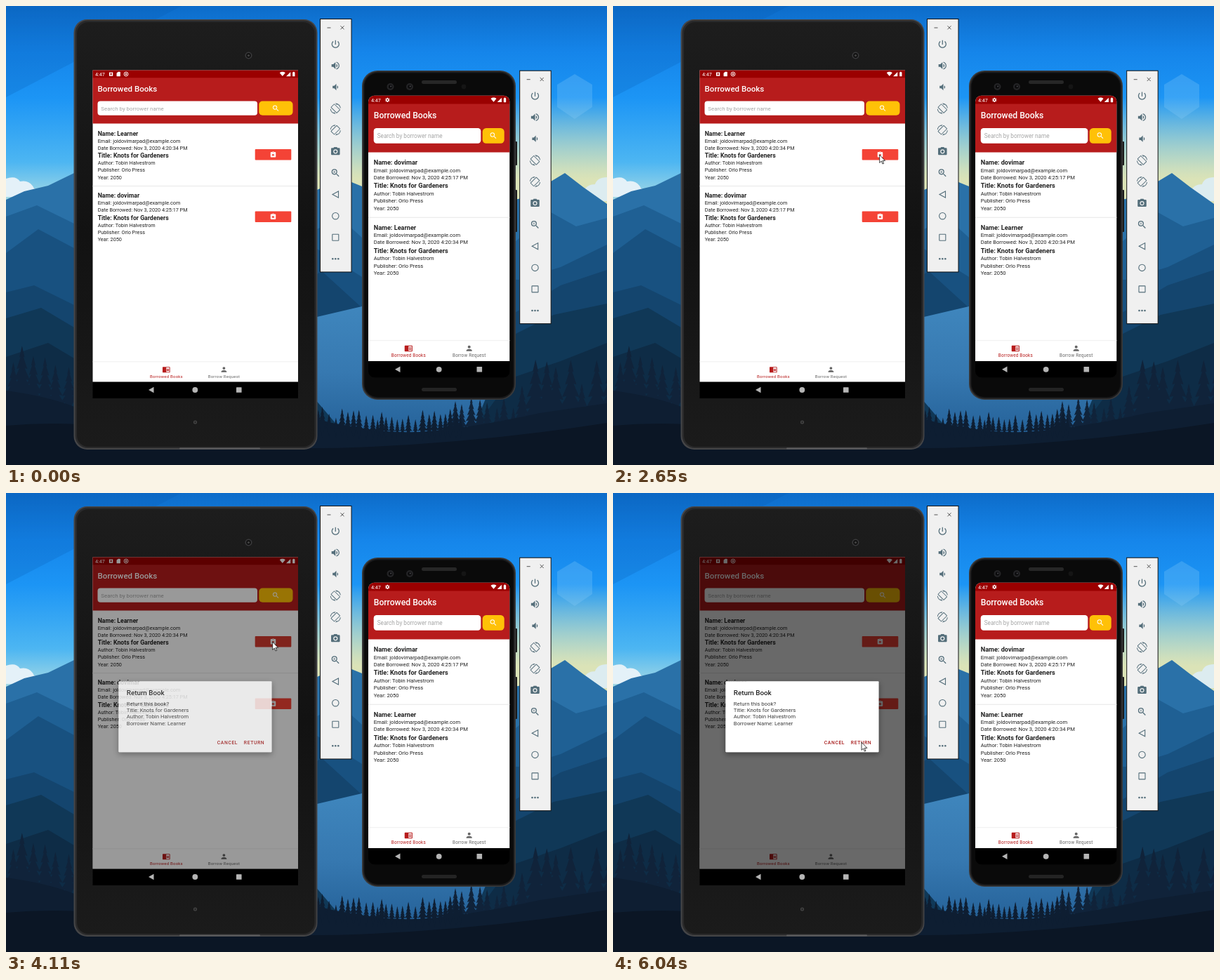
Write an HTML page that moves like this. It is 856x654 px and loops after 8 s.

```html
<!DOCTYPE html>
<html lang="en">
<head>
<meta charset="utf-8">
<title>Borrowed Books</title>
<style>
html, body { margin: 0; width: 100%; height: 100%; overflow: hidden; background: #0b1422; }
svg { display: block; width: 100%; height: 100%; font-family: Roboto, "Noto Sans", sans-serif; user-select: none; }
</style>
</head>
<body>
<svg id="stage" viewBox="0 0 856 654"></svg>
<script>
const LOOP = 8000;
const stage = document.getElementById('stage');

const icons = {
  search: 'M15.5 14h-.79l-.28-.27A6.47 6.47 0 0 0 16 9.5 6.5 6.5 0 1 0 9.5 16c1.61 0 3.09-.59 4.23-1.57l.27.28v.79l5 4.99L20.49 19l-4.99-5zm-6 0C7.01 14 5 11.99 5 9.5S7.01 5 9.5 5 14 7.01 14 9.5 11.99 14 9.5 14z',
  person: 'M12 12a4 4 0 1 0 0-8 4 4 0 0 0 0 8zm0 2c-2.67 0-8 1.34-8 4v2h16v-2c0-2.66-5.33-4-8-4z',
  reader: 'M13 12h7v1.5h-7zm0-2.5h7V11h-7zm0 5h7V16h-7zM21 4H3c-1.1 0-2 .9-2 2v13c0 1.1.9 2 2 2h18c1.1 0 2-.9 2-2V6c0-1.1-.9-2-2-2zm0 15h-9V6h9v13z',
  giveBack: 'M19 3h-4.18C14.4 1.84 13.3 1 12 1s-2.4.84-2.82 2H5c-1.1 0-2 .9-2 2v14c0 1.1.9 2 2 2h14c1.1 0 2-.9 2-2V5c0-1.1-.9-2-2-2zm-7 0c.55 0 1 .45 1 1s-.45 1-1 1-1-.45-1-1 .45-1 1-1zm4 12h-4v3l-5-5 5-5v3h4v4z',
  power: 'M13 3h-2v10h2V3zm4.83 2.17l-1.42 1.42C17.99 7.86 19 9.81 19 12c0 3.87-3.13 7-7 7s-7-3.13-7-7c0-2.19 1.01-4.14 2.58-5.42L6.17 5.17C4.23 6.82 3 9.26 3 12c0 4.97 4.03 9 9 9s9-4.03 9-9c0-2.74-1.23-5.18-3.17-6.83z',
  louder: 'M3 9v6h4l5 5V4L7 9H3zm13.5 3c0-1.77-1.02-3.29-2.5-4.03v8.05c1.48-.73 2.5-2.25 2.5-4.02zM14 3.23v2.06c2.89.86 5 3.54 5 6.71s-2.11 5.85-5 6.71v2.06c4.01-.91 7-4.49 7-8.77s-2.99-7.86-7-8.77z',
  quieter: 'M18.5 12c0-1.77-1.02-3.29-2.5-4.03v8.05c1.48-.73 2.5-2.25 2.5-4.02zM5 9v6h4l5 5V4L9 9H5z',
  rotate: 'M16.48 2.52c3.27 1.55 5.61 4.72 5.97 8.48h1.5C23.44 4.84 18.29 0 12 0l-.66.03 3.81 3.81 1.33-1.32zm-6.25-.77c-.59-.59-1.54-.59-2.12 0L1.75 8.11c-.59.59-.59 1.54 0 2.12l12.02 12.02c.59.59 1.54.59 2.12 0l6.36-6.36c.59-.59.59-1.54 0-2.12L10.23 1.75zm4.6 19.44L2.81 9.17l6.36-6.36 12.02 12.02-6.36 6.36zm-7.31.29C4.25 19.94 1.91 16.76 1.55 13H.05C.56 19.16 5.71 24 12 24l.66-.03-3.81-3.81-1.33 1.32z',
  camera: 'M9 2L7.17 4H4c-1.1 0-2 .9-2 2v12c0 1.1.9 2 2 2h16c1.1 0 2-.9 2-2V6c0-1.1-.9-2-2-2h-3.17L15 2H9zm3 15a5 5 0 1 1 0-10 5 5 0 0 1 0 10zm0-8a3 3 0 1 0 0 6 3 3 0 0 0 0-6z',
  plus: 'M12 10h-2v2H9v-2H7V9h2V7h1v2h2v1z',
  gear: 'M10 2h4l.5 3 2 1 2.8-1 2 3.5-2.3 1.9v2.2l2.3 1.9-2 3.5-2.8-1-2 1-.5 3h-4l-.5-3-2-1-2.8 1-2-3.5L5 12.600v-2.200L2.700 8.500l2-3.500 2.800 1 2-1zM12 8a3.500 3.500 0 1 0 0 7 3.500 3.500 0 0 0 0-7z',
  wifi: 'M12 21L0 6.500C7 1 17 1 24 6.500z',
  signal: 'M2 22h20V2z',
  battery: 'M15.700 4H14V2h-4v2H8.300C7.600 4 7 4.600 7 5.300v15.400c0 .7.6 1.300 1.300 1.300h7.400c.7 0 1.300-.6 1.300-1.300V5.300c0-.7-.6-1.300-1.300-1.300z',
  card: 'M18 2h-8L4 8v12c0 1.100.9 2 2 2h12c1.100 0 2-.9 2-2V4c0-1.100-.9-2-2-2z',
  box: 'M3 3h18v18H3zM9 7v6H7l5 5 5-5h-2V7z'
};

// Drawing helpers
const rect = (x, y, w, h, fill, r = 0, more = '') =>
  `<rect x="${x}" y="${y}" width="${w}" height="${h}" rx="${r}" fill="${fill}" ${more}/>`;
const circle = (x, y, r, fill, more = '') => `<circle cx="${x}" cy="${y}" r="${r}" fill="${fill}" ${more}/>`;
const path = (d, fill, more = '') => `<path d="${d}" fill="${fill}" ${more}/>`;
const text = (x, y, size, str, fill = '#212121', more = '') =>
  `<text x="${x}" y="${y}" font-size="${size}" fill="${fill}" ${more}>${str}</text>`;
const icon = (name, x, y, size, fill, flip = 1) => {
  const s = size / 24;
  return path(icons[name], fill,
    `fill-rule="evenodd" transform="translate(${x} ${y}) scale(${s * flip} ${s}) translate(-12 -12)"`);
};
const gradient = (id, stops, dir = 'x2="0" y2="1"') => `<linearGradient id="${id}" ${dir}>` +
  stops.map(([at, c]) => `<stop offset="${at}" stop-color="${c}"/>`).join('') + '</linearGradient>';
const land = (points, fill) => path(`M${points}V654H0z`, fill);

// Landscape
let seed = 11;
const random = () => (seed = (seed * 16807) % 2147483647) / 2147483647;

function tree(x, base, h) {
  const w = h * 0.23;
  let left = '', right = '';
  for (let i = 1; i <= 5; i++) {
    const y = base - h + h * i / 5, out = w * i / 5;
    right += `L${x + out} ${y}L${x + out * 0.5} ${y - 1}`;
    left = `L${x - out * 0.5} ${y - 1}L${x - out} ${y}` + left;
  }
  return `M${x} ${base - h}${right}L${x} ${base + 14}${left}z`;
}

function forest(from, to, gap, base, height) {
  let d = '';
  for (let x = from; x < to; x += gap * (0.7 + random() * 0.6)) d += tree(x, base(x), height * (0.65 + random() * 0.6));
  return d;
}

function scenery() {
  const valley = x => 606 - Math.pow((x - 560) / 300, 2) * 42;
  return rect(0, 0, 856, 654, 'url(#sky)') +
    rect(430, 130, 426, 180, 'url(#glow)') +
    path('M0 0H250L0 130z', '#0758ad', 'opacity=".22"') +
    path('M810 97l25 15v32l-25 17-25-17v-32z', '#8fd0f5', 'opacity=".25"') +
    path('M0 246q14-5 20 4 14-3 20 10 12 2 16 12H0z', '#e4f1f8') +
    path('M856 244q-14 0-17 10-13 0-17 12-10 2-12 12h46z', '#dcecf0') +
    land('0 276L26 264 60 256 97 238 180 285 443 262 480 246 507 257 600 290 730 275 776 250 796 238 822 258 856 282', '#2a71a8') +
    land('0 300L44 284 97 310 300 330 443 318 476 302 507 330 720 340 776 294 812 314 856 302', '#1f6094') +
    land('0 352L46 318 97 345 400 380 443 346 507 386 730 390 790 372 856 340', '#185180') +
    land('0 408L40 398 97 426 410 400 450 378 507 430 720 440 790 398 856 376', '#14456e') +
    path('M430 446L507 428 650 440 740 500 740 620H430z', 'url(#lake)') +
    land('0 445L50 430 97 458 300 560 440 560 508 640 650 640 720 470 780 440 856 424', '#103857') +
    land('0 500L60 480 97 502 250 590 440 590 650 625 720 530 790 506 856 480', '#0e2c46') +
    path(forest(-6, 110, 17, x => 566, 70), '#10233a') +
    path(forest(640, 735, 12, x => 600, 42) + forest(735, 870, 18, x => 592, 72), '#10233a') +
    land('0 548Q60 556 100 572T440 588Q530 612 600 606T760 580L856 566', '#0e1e32') +
    path(forest(438, 650, 8, valley, 24), '#0e1e32') +
    land('0 598Q110 588 230 612T520 628T856 594', '#0b1625');
}

// Emulator side panel
function toolbar(dx, dy) {
  const c = '#546e7a', x = 469.3;
  const line = `stroke="${c}" stroke-width="1.1"`;
  const names = ['power', 'louder', 'quieter', 'rotate', 'rotate', 'camera', 'search'];
  const glyphs = names.map((n, i) => icon(n, x, 54.3 + i * 30.6, i === 2 ? 14 : 15, c, i === 4 ? -1 : 1)).join('');
  return `<g transform="translate(${dx} ${dy})">` +
    rect(447.5, 18.5, 44.5, 360.5, '#f0f0f0', 0, 'stroke="#111"') +
    path('M457.500 31h5M476.500 28.300l5 5m0-5l-5 5', 'none', 'stroke="#555"') +
    glyphs + icon('plus', x, 237.9, 15, c) +
    path('M465 268.500l8.500-4.600v9.200z', 'none', line) +
    circle(x, 299.2, 4.7, 'none', line) +
    rect(x - 4.5, 325.2, 9, 9, 'none', 0.5, line) +
    [-4, 0, 4].map(d => circle(x + d, 360.3, 1.3, c)).join('') + '</g>';
}

// App screens
const people = {
  learner: { name: 'Learner', date: 'Nov 3, 2020 4:20:34 PM' },
  dovimar: { name: 'dovimar', date: 'Nov 3, 2020 4:25:17 PM' }
};
const book = { title: 'Knots for Gardeners', author: 'Tobin Halvestrom', press: 'Orlo Press' };

function entry(who, x, y, k) {
  const bold = 'font-weight="700"';
  return [
    [0, `Name: ${who.name}`, 1],
    [9.9, 'Email: joldovimarpad@example.com'],
    [19.9, `Date Borrowed: ${who.date}`],
    [31.4, `Title: ${book.title}`, 1],
    [41.4, `Author: ${book.author}`],
    [51.4, `Publisher: ${book.press}`],
    [61.5, 'Year: 2050']
  ].map(([dy, str, strong]) => text(x, y + dy * k, (strong ? 8.7 : 7.25) * k, str, '#212121', strong ? bold : '')).join('');
}

function tab(x, y, k, name, label, fill) {
  return icon(name, x, y, 11.6 * k, fill) +
    text(x + 0.1, y + 12.3, 6 * k, label, fill, 'text-anchor="middle" letter-spacing=".22"');
}

function header(x, y, size) {
  return text(x, y, size, 'Borrowed Books', '#fff', 'font-weight="500"');
}

function statusIcons(x, y) {
  return icon('wifi', x, y, 8, '#fff') + icon('signal', x + 8.3, y, 7.5, '#fff') + icon('battery', x + 16, y, 8, '#fff');
}

function navKeys(back, home, recent, y) {
  const c = '#b5b5b5';
  return path(`M${back - 4} ${y}l7.500-4.300v8.600z`, c) + circle(home, y, 3.9, c) + rect(recent - 3.8, y - 3.8, 7.6, 7.6, c, 0.6);
}

function returnButton(y, id = '') {
  return rect(354.7, y, 51.6, 15.5, '#f44336', 1) +
    (id ? `<g clip-path="url(#buttonClip)">${circle(380.500, y + 7.7, 0, '#000', `id="${id}"`)}</g>` : '') +
    icon('giveBack', 380.5, y + 7.8, 10, '#fff');
}

function tablet() {
  return rect(96.5, 19, 347, 613, '#454547', 19) +
    rect(98.5, 20.5, 343.5, 609.5, '#2a2a2b', 18) +
    rect(101, 23, 338.5, 605, 'url(#slab)', 16) +
    rect(247, 629.5, 115, 2, '#606062', 1) +
    circle(345.5, 70.5, 5, '#3a3a3c') + circle(345.5, 70.5, 3.4, '#111') + circle(345.5, 70.5, 1.6, '#444') +
    circle(269.5, 593, 2.6, '#444') + circle(269.5, 593, 1.2, '#222') +
    rect(123.5, 91.5, 292.5, 467.5, '#000') +
    rect(123.5, 91.5, 292.5, 444, '#fff') +
    rect(123.5, 102, 292.5, 65.5, '#b71c1c') +
    rect(123.5, 91.5, 292.5, 10.8, '#9b0000') +
    text(127, 99.5, 7.2, '4:47', '#fff') +
    icon('box', 149.6, 97, 7, '#fff') + icon('card', 160.2, 97, 8, '#fff') +
    circle(171, 97, 2.9, 'none', 'stroke="#fff"') + circle(171, 97, 1.2, '#fff') +
    statusIcons(393.8, 97) + header(130.6, 122.2, 11.5) +
    rect(130.5, 135.5, 227.5, 20.3, '#fff', 4) +
    text(135.3, 148.6, 7.9, 'Search by borrower name', '#a5a5a5') +
    rect(360.3, 135.5, 48.2, 20.3, '#ffc107', 5) + icon('search', 384.3, 145.8, 11.5, '#fff') +
    entry(people.learner, 130.7, 185, 1) + entry(people.dovimar, 130.7, 273.3, 1) +
    rect(123.5, 256.2, 292.5, 0.9, '#e4e4e4') +
    returnButton(204, 'ripple') + returnButton(292.4) +
    rect(123.5, 506.5, 292.5, 0.8, '#ececec') +
    tab(228.3, 518, 1, 'reader', 'Borrowed Books', '#b71c1c') +
    tab(310.4, 518, 1, 'person', 'Borrow Request', '#666') +
    navKeys(207, 269.3, 331.8, 547);
}

function phone() {
  const k = 1.05;
  return rect(725, 193, 3, 34, '#1a1a1a', 1) + rect(725, 262, 3, 60, '#1a1a1a', 1) +
    rect(507, 92, 219, 469, '#39393a', 22) +
    rect(508.7, 93.5, 215.6, 466, '#1b1b1c', 21) +
    rect(510.5, 95.5, 212, 462, '#0a0a0a', 19) +
    rect(592, 106, 50, 5, '#272727', 2.5) + rect(592, 544, 50, 5, '#242424', 2.5) +
    [547.5, 575].map(x => circle(x, 115, 5, '#242426') + circle(x, 115, 2.7, '#0b0b0c') + circle(x + 0.7, 114.5, 1, '#4b4b50')).join('') +
    circle(652, 115, 3.4, '#151515') +
    `<g clip-path="url(#phoneClip)">` +
    rect(516, 127.5, 201.5, 402, '#000') +
    rect(516, 127.5, 201.5, 378.5, '#fff') +
    rect(516, 139, 201.5, 69.5, '#b71c1c') +
    rect(516, 127.5, 201.5, 12, '#9b0000') + '</g>' +
    text(520, 136.5, 7.2, '4:47', '#fff') + icon('gear', 543.3, 134, 7.8, '#fff') + statusIcons(694.5, 133.8) +
    header(523.7, 160.4, 12.2) +
    rect(523.7, 174, 152.6, 21.7, '#fff', 4.2) +
    text(528.7, 188, 8.2, 'Search by borrower name', '#a5a5a5') +
    rect(678.7, 174, 31, 21.7, '#ffc107', 5.2) + icon('search', 694.1, 184.8, 12, '#fff') +
    entry(people.dovimar, 523.7, 226.3, k) + entry(people.learner, 523.7, 318.6, k) +
    rect(516, 300.8, 201.5, 0.9, '#e4e4e4') +
    rect(516, 476.3, 201.5, 0.8, '#ececec') +
    tab(573.3, 487.7, k, 'reader', 'Borrowed Books', '#b71c1c') +
    tab(659.7, 487.7, k, 'person', 'Borrow Request', '#666') +
    navKeys(558, 616.7, 674.3, 517.8);
}

function dialog() {
  const action = (x, str) => text(x, 358, 6.8, str, '#a81c1c', 'font-weight="500" letter-spacing=".6"');
  const lines = ['Return this book?', `Title: ${book.title}`, `Author: ${book.author}`, `Borrower Name: ${people.learner.name}`];
  return rect(123.5, 91.5, 292.5, 444.3, '#000', 0, 'id="dim" opacity="0"') +
    '<g id="dialog" opacity="0">' +
    rect(160.3, 268.3, 218.2, 101, '#fff', 1, 'filter="url(#shadow)"') +
    text(171.8, 287.8, 9.8, 'Return Book', '#202020', 'font-weight="500"') +
    lines.map((str, i) => text(171.8, 302.6 + i * 9.3, 7.8, str, '#3c3c3c')).join('') +
    action(300.8, 'CANCEL') + action(338.8, 'RETURN') + '</g>';
}

stage.innerHTML = '<defs>' +
  gradient('sky', [[0, '#0d6cc9'], [0.1, '#1585ea'], [0.2, '#1c95f5'], [0.34, '#4db6f2'], [0.42, '#a5d9e4']]) +
  gradient('glow', [[0, 'rgba(225,228,178,0)'], [0.65, '#dbe3b7']]) +
  gradient('lake', [[0, '#3f86bd'], [0.5, '#3678b0'], [1, '#235f96']]) +
  gradient('slab', [[0, '#1d1d1d'], [0.5, '#121212'], [1, '#1b1b1b']]) +
  '<filter id="shadow" x="-15%" y="-20%" width="130%" height="150%"><feDropShadow dx="0" dy="3" stdDeviation="4" flood-opacity=".4"/></filter>' +
  `<clipPath id="buttonClip">${rect(354.7, 204, 51.6, 15.5, '#000', 1)}</clipPath>` +
  `<clipPath id="phoneClip">${rect(516, 127.5, 201.5, 402, '#000', 9)}</clipPath></defs>` +
  scenery() + tablet() + dialog() + toolbar(0, 0) + phone() + toolbar(284.2, 73.7) +
  path('M0 0v11.200l2.600-2.400 1.700 4 1.700-.7-1.700-3.900h3.600z', '#fff', 'id="cursor" stroke="#111" stroke-width=".8" stroke-linejoin="round"');

const [ripple, dim, box, cursor] = ['ripple', 'dim', 'dialog', 'cursor'].map(id => document.getElementById(id));

const stepsDone = (t, from, to, n) =>
  t < from ? 0 : Math.min(n, Math.floor((t - from) / (to - from) * (n - 1) + 0.08) + 1);
const smooth = u => u * u * (3 - 2 * u);

const moves = [
  { from: 1280, to: 2070, n: 13, x: 407, y: 213 },
  { from: 2140, to: 2650, n: 9, x: 379.7, y: 212.2 },
  { from: 4600, to: 5400, n: 13, x: 354.6, y: 345.3 },
  { from: 5470, to: 5600, n: 3, x: 354.4, y: 350.3 },
  { from: 5780, to: 6040, n: 5, x: 354, y: 355.2 }
];

function cursorAt(t) {
  let x = 808.3, y = 632.2;
  moves.forEach((m, i) => {
    const done = stepsDone(t, m.from, m.to, m.n);
    const u = smooth(i ? done / m.n : Math.max(0, done - 1) / (m.n - 1));
    x += (m.x - x) * u;
    y += (m.y - y) * u;
  });
  return [x, y];
}

function update(t) {
  const [x, y] = cursorAt(t);
  cursor.setAttribute('transform', `translate(${x} ${y})`);
  cursor.setAttribute('visibility', t < 1280 ? 'hidden' : 'visible');

  const press = stepsDone(t, 3790, 4050, 5);
  const fade = stepsDone(t, 4170, 4300, 3) / 3;
  ripple.setAttribute('r', press < 5 ? press * 4.5 : 30);
  ripple.setAttribute('opacity', 0.13 * (1 - fade));

  const shown = stepsDone(t, 4050, 4170, 3);
  dim.setAttribute('opacity', [0, 0.14, 0.4, 0.59][shown]);
  box.setAttribute('opacity', [0, 0.4, 0.8, 1][shown]);
}

const start = performance.now();
function play() {
  update((performance.now() - start) % LOOP);
  requestAnimationFrame(play);
}
play();
</script>
</body>
</html>
```
